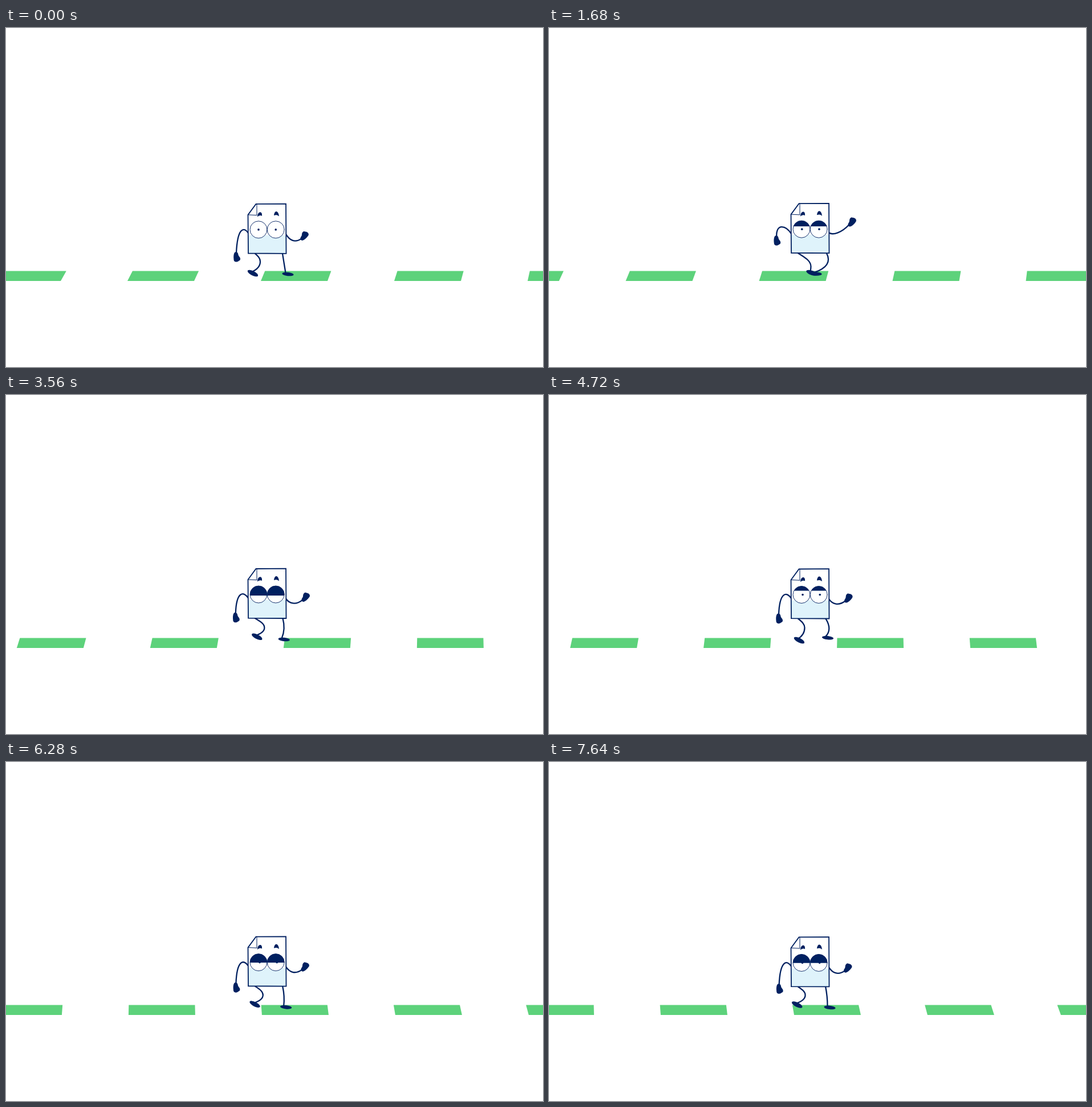
These frames come from a looping animation (942 by 595 pixels, 7680 ms). An HTML page with a canvas:

```html
<!DOCTYPE html>
<html lang="en">
<head>
<meta charset="utf-8">
<title>Walking page</title>
<style>
html, body { margin: 0; width: 100%; height: 100%; overflow: hidden; background: #fff; }
canvas { display: block; }
</style>
</head>
<body>
<canvas id="stage" width="942" height="595"></canvas>
<script>
const ctx = document.getElementById('stage').getContext('2d');
const NAVY = '#002060', GREEN = '#5dd27b', PALE = '#dff3fb';
const LOOP = 7680, FRAME = 40;
const GAIT = 689;            // two steps
const SPEED = 0.186;         // road, px per ms
const { cos, sin, max, min, PI } = Math;

// eyelid edge relative to the eye centre, over two gaits
const LID = [[0, -16], [150, -16], [302, -5], [586, -7], [768, 0.5],
             [804, 2], [950, 2], [1200, -16], [1378, -16]];

function keyed(keys, t) {
  let i = 1;
  while (i < keys.length - 1 && t > keys[i][0]) i++;
  const [t0, a] = keys[i - 1], [t1, b] = keys[i];
  const k = (t - t0) / (t1 - t0);
  return a + (b - a) * k * k * (3 - 2 * k);
}

function fill(path, color) {
  ctx.fillStyle = color;
  ctx.fill(path);
}

function line(path, width) {
  ctx.strokeStyle = NAVY;
  ctx.lineWidth = width;
  ctx.stroke(path);
}

function poly(...pts) {
  const p = new Path2D();
  pts.forEach(([x, y]) => p.lineTo(x, y));
  p.closePath();
  return p;
}

function disc(x, y, r) {
  const p = new Path2D();
  p.arc(x, y, r, 0, 2 * PI);
  return p;
}

function curve(a, c1, c2, b) {
  const p = new Path2D();
  p.moveTo(...a);
  p.bezierCurveTo(...c1, ...c2, ...b);
  return p;
}

function road(t) {
  const shift = SPEED * t;
  const lean = u => (1440 - u) * 0.0073;
  for (let u = 213 - 234 * 2; u - shift < 960; u += 234) {
    const v = u + 117, l = u - shift, r = v - shift;
    fill(poly([l, 444], [l + lean(u), 426.5], [r + lean(v), 426.5], [r, 444]), GREEN);
  }
}

const HAND = new Path2D('M-3.5-8C-1-10 2.5-9 3-4C3.5-1 7 0 6.5 4C6 6.5 4 6 3 7.5' +
                        'C0 9.5-5 9-5 4C-5.5 0-5.5-5-3.5-8Z');

function hand(x, y, turn) {
  ctx.save();
  ctx.translate(x, y);
  ctx.rotate(turn);
  fill(HAND, NAVY);
  ctx.restore();
}

function foot(x, y, deg, ry) {
  const p = new Path2D();
  p.ellipse(x, y, 10.2, ry, deg * PI / 180, 0, 2 * PI);
  fill(p, NAVY);
}

function legs(a, b) {
  const c = cos(a), s = sin(a), up = max(0, s), down = max(0, -s);
  const hipY = b + 87;

  // rear leg
  const lx = 447.5 - 14.5 * c, ly = 430.5 - 9 * up * (0.6 + 0.4 * c);
  const kx = 452 - 6 * c + 5 * up, ky = b + 101 + 5 * (1 - c);
  const ax = lx - 3, ay = ly - 2, hx = 437;
  const p = new Path2D();
  p.moveTo(hx, hipY);
  p.bezierCurveTo(hx + 0.6 * (kx - hx), hipY + 0.35 * (ky - hipY),
                  kx, ky - 0.4 * (ky - hipY), kx, ky);
  p.bezierCurveTo(kx, ky + 0.45 * (ay - ky),
                  ax + 0.55 * (kx - ax), ay - 0.2 * (ay - ky), ax, ay);
  line(p, 2.3);
  foot(lx, ly, 27 - 8 * max(0, -c), 3.9);

  // front leg
  const rx = 481 + 13.5 * c, ry = 432 - 2 * (1 - cos(2 * a)) - 4 * down;
  const bow = 6 * (1 - c) + 4.5 * down;
  const sx = 486 - c, ex = rx - 4, ey = ry - 2;
  const q = new Path2D();
  q.moveTo(sx, hipY);
  q.quadraticCurveTo((sx + ex) / 2 + 2 * bow, (hipY + ey) / 2 + bow / 2, ex, ey);
  line(q, 2.3);
  foot(rx, ry, 6 - 3 * max(0, -c), 3.2);
}

function arms(a, b) {
  const c = cos(a), g = (1 - c) / 2, dy = b - 309;
  const lx = 402 + 2.5 * c, ly = 387.5 + 14.5 * c + dy;
  line(curve([425, b + 51 + 2 * g], [418 - 3 * g, b + 40 - 2 * g],
             [406 - 8 * g, b + 40 - 6 * g], [lx - 0.5, ly - 7]), 2.3);
  hand(lx, ly, 0);

  const rx = 527.2 - 4.2 * c, ry = 352.7 + 12.3 * c + dy;
  line(curve([491, b + 53 - 2 * g], [497 + g, b + 63 - 7 * g],
             [506 + 8 * g, b + 69 - 19 * g], [rx - 5, ry + 5]), 2.3);
  hand(rx, ry, 1.25 * PI);
}

function eye(x, y, look, lid) {
  const ball = disc(x, y, 15);
  fill(ball, '#fff');
  fill(disc(x + look, y, 1.8), NAVY);
  if (lid > -15) {
    ctx.save();
    ctx.clip(ball);
    ctx.fillStyle = NAVY;
    ctx.fillRect(x - 16, y - 16, 32, 16 + lid);
    ctx.restore();
  }
  line(ball, 0.9);
}

function body(a, b, lid) {
  const sheet = poly([438.5, b], [491, b - 0.3], [491.5, b + 87],
                     [425, b + 86.6], [424.5, b + 19]);
  fill(sheet, '#fff');
  ctx.save();
  ctx.clip(sheet);
  ctx.fillStyle = PALE;
  ctx.fillRect(424, b + 55, 70, 34);
  ctx.restore();
  line(sheet, 1.8);

  const fold = new Path2D();
  fold.moveTo(440, b);
  fold.lineTo(440, b + 19.7);
  fold.lineTo(425, b + 19);
  line(fold, 1);

  const left = curve([441, b + 22.5], [441, b + 13], [450, b + 11], [449, b + 21]);
  left.bezierCurveTo(447, b + 19.5, 444, b + 20, 441, b + 22.5);
  fill(left, NAVY);
  const right = curve([470, b + 20], [471, b + 10], [478, b + 11], [479, b + 21.5]);
  right.bezierCurveTo(476, b + 19, 473, b + 19, 470, b + 20);
  fill(right, NAVY);

  const look = min(2, 2.6 * (1 - cos(2 * a)));
  eye(443, b + 45, look, lid);
  eye(473.2, b + 45, look, lid);
}

function draw(t) {
  const a = 2 * PI * t / GAIT;
  const b = 306.3 + 2.6 * cos(2 * a);
  ctx.fillStyle = '#fff';
  ctx.fillRect(0, 0, 942, 595);
  ctx.lineCap = 'round';
  ctx.lineJoin = 'miter';
  road(t);
  legs(a, b);
  arms(a, b);
  body(a, b, keyed(LID, t % (2 * GAIT)));
}

const start = performance.now();
function tick() {
  const t = (performance.now() - start) % LOOP;
  draw(Math.floor(t / FRAME) * FRAME);
  requestAnimationFrame(tick);
}
tick();
</script>
</body>
</html>
```
